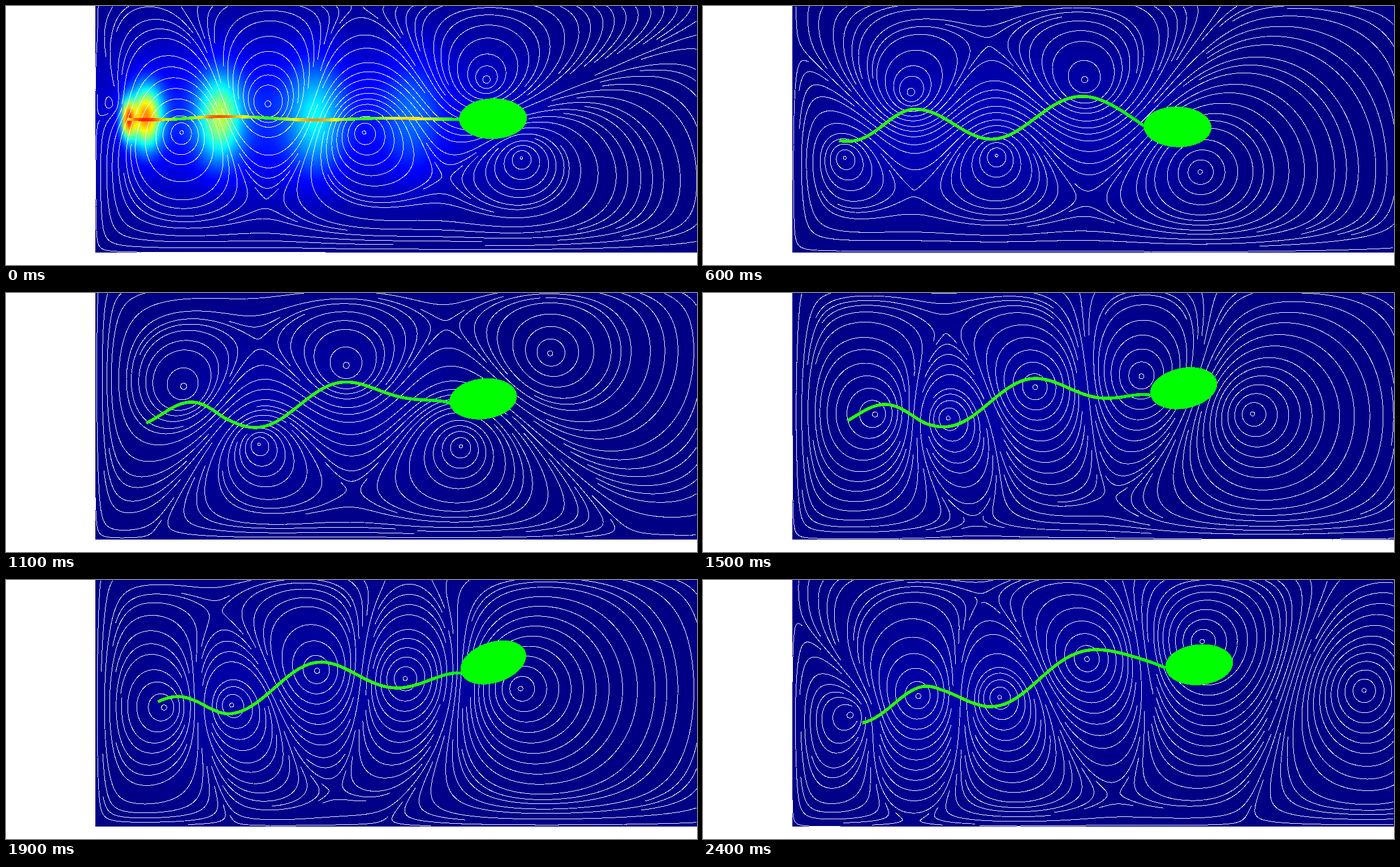
Animation of 1222x458 px, one loop 2.5 s. Source, as an HTML page with a canvas:

```html
<!DOCTYPE html>
<html lang="en">
<head>
<meta charset="utf-8">
<title>Swimmer in a viscous channel</title>
<style>
  html, body { margin: 0; width: 100%; height: 100%; overflow: hidden; background: #fff; }
  #heat { position: absolute; left: 158px; top: 0; width: 1064px; height: 440px; }
  svg { position: absolute; left: 0; top: 0; width: 1222px; height: 458px; }
</style>
</head>
<body>
<canvas id="heat" width="133" height="55"></canvas>
<svg viewBox="0 0 1222 458" shape-rendering="crispEdges">
  <defs><linearGradient id="shade" gradientUnits="userSpaceOnUse" y1="0" y2="0"></linearGradient></defs>
  <rect x="158" y="436" width="1064" height="22" fill="#fff"/>
  <path id="flow" fill="none" stroke="#fff" stroke-width="1"/>
  <path id="tail" fill="none" stroke="url(#shade)" stroke-width="5.5" stroke-linejoin="round"/>
  <ellipse id="head" rx="60" ry="36" fill="#0f0"/>
</svg>
<script>
const STEP_MS = 100, STEPS = 25;
const X0 = 158, X1 = 1222, Y1 = 436;
const WAVE = 310, HALF = WAVE / 2, LENGTH = 536, CREST = 187;
const REACH = 130, SEP = 17, GAP = 7, STRIDE = 2;
const TAU = 2 * Math.PI;
const $ = id => document.getElementById(id);
const lerp = (a, b, w) => a + (b - a) * w;
const clamp = v => Math.max(0, Math.min(1, v));

// the wave shortens towards the tip
const unfold = s => s > 400 ? 400 + (s - 400) / .75 : s;
const fold = s => s > 400 ? 400 + (s - 400) * .75 : s;

// everything about the swimmer that follows from the time step
function swimmer(n) {
  const m = n - 3, grow = Math.min(1, .1 + .3 * n), start = 1 - grow;
  const beat = .243 * m + 8e-5 * m ** 3;
  const sway = grow * Math.sin(TAU * beat);
  const x = 842 + .0041 * m ** 3 + 3 * sway + 19 * Math.exp(-n);
  const y = 209 - 2.6 * m - .035 * m * m - 13 * sway - 16 * Math.exp(-n);
  const tilt = grow * (-5 - .33 * m) - 8 * sway;
  const a = tilt * Math.PI / 180;
  const len = LENGTH + 50 * Math.exp(-n / 2);
  return {
    n, grow, beat, sway, x, y, tilt, len, stretch: len / LENGTH,
    jx: x - 60 * Math.cos(a), jy: y - 60 * Math.sin(a),
    shape: beat + .4 * start, swirl: beat + .14 * start
  };
}

// height of the tail at distance u behind the head
function tailY(p, u) {
  const s = u / p.stretch, b = s / 80;
  const drift = (.06 + .0075 * (p.n - 3)) * s - 32 * (1 - Math.exp(-s / 60));
  const bend = 18 * p.sway * b * Math.exp((1 - b * b) / 2);
  const swing = 35 * Math.sin(Math.PI * s / 620) * Math.cos(TAU * ((unfold(s) - CREST) / WAVE - p.shape));
  return p.jy + p.grow * (drift - swing) + bend;
}

// one eddy rides on every crest and trough; those at the head are pushed forward and aside
function eddiesOf(p) {
  const list = [], front = CREST + WAVE * p.swirl;
  const late = clamp((p.n - 11) / 4);
  const aside = lerp(80 - 125 * Math.max(0, p.sway), -45, late);
  for (let k = Math.ceil((front - 650) / HALF); front - HALF * k > -200; k++) {
    const s = front - HALF * k, u = fold(s) * p.stretch, sign = k % 2 ? -1 : 1;
    const power = clamp((650 - s) / 100) * clamp((200 + s) / 50);
    if (power < .05) continue;
    const near = clamp((90 - s) / 60), ahead = clamp((-70 - s) / 60);
    list.push({
      x: p.jx - u + 48 * near + (10 * p.n - 108) * ahead,
      y: lerp(tailY(p, Math.max(0, Math.min(u, p.len))), p.y, clamp(-s / 60)) - sign * aside * lerp(.35, 1, near),
      s: sign * power
    });
  }
  return list.sort((a, b) => a.x - b.x);
}

const wall = d => d * d / (d * d + 1200);

function stream(x, y, eddies) {
  let sum = 0;
  for (const e of eddies)
    sum += e.s * Math.exp(-Math.sqrt((x - e.x) ** 2 + (y - e.y) ** 2 + 30) / REACH);
  return sum * wall(x - X0 + 2) * wall(1290 - x) * wall(438 - y) * wall(y + 45);
}

function direction(x, y, eddies) {
  const u = stream(x, y + 1, eddies) - stream(x, y - 1, eddies);
  const v = stream(x - 1, y, eddies) - stream(x + 1, y, eddies);
  const r = Math.hypot(u, v) || 1;
  return [u / r, v / r];
}

const inside = (x, y) => x >= X0 && x <= X1 && y >= 0 && y <= Y1;

// evenly spaced streamlines: a line starts in free space and ends where it meets another
function streamlines(eddies) {
  const cols = Math.ceil((X1 - X0) / SEP) + 1, buckets = new Map(), out = [];
  const cell = (x, y) => [Math.floor((x - X0) / SEP), Math.floor(y / SEP)];

  function crowded(x, y, d) {
    const [i, j] = cell(x, y);
    for (let b = j - 1; b <= j + 1; b++) for (let a = i - 1; a <= i + 1; a++)
      for (const [px, py] of buckets.get(b * cols + a) || [])
        if ((px - x) ** 2 + (py - y) ** 2 < d * d) return true;
    return false;
  }

  function follow(x, y, h) {
    const pts = [], sx = x, sy = y;
    for (let i = 0; i < 1000; i++) {
      const [u, v] = direction(x, y, eddies);
      const [mu, mv] = direction(x + u * h / 2, y + v * h / 2, eddies);
      x += mu * h;
      y += mv * h;
      if (!inside(x, y) || crowded(x, y, GAP)) break;
      pts.push([x, y]);
      if (i > 6 && Math.hypot(x - sx, y - sy) < STRIDE) return { pts, closed: true };
    }
    return { pts, closed: false };
  }

  function plant(x, y) {
    if (!inside(x, y) || crowded(x, y, SEP)) return;
    const { pts, closed } = follow(x, y, STRIDE);
    const back = closed ? [] : follow(x, y, -STRIDE).pts.reverse();
    const line = [...back, [x, y], ...pts];
    if (!closed && line.length < 16) return;
    for (const q of line) {
      const [i, j] = cell(q[0], q[1]), key = j * cols + i;
      buckets.has(key) ? buckets.get(key).push(q) : buckets.set(key, [q]);
    }
    out.push('M' + line.map(q => q[0].toFixed(1) + ' ' + q[1].toFixed(1)).join('L') + (closed ? 'Z' : ''));
  }

  for (let r = 4; r < 240; r += SEP + 1)
    for (const e of eddies) {
      plant(e.x, e.y + r);
      plant(e.x, e.y - r);
    }
  for (let y = 4; y < Y1; y += 8)
    for (let x = X0 + 5; x < X1; x += 8) plant(x, y);
  return out.join('');
}

const ctx = $('heat').getContext('2d');

// fast flow crosses the tail between the eddies, hottest at the tip during the first beat
function paintHeat(p, eddies) {
  const blobs = [], fade = Math.pow(clamp(1 - p.n / 3), 3);
  const glow = .025 + .035 * Math.exp(-Math.abs(p.n - 3) / 4);
  eddies.slice(1).forEach((e, i) => {
    const o = eddies[i];
    if (e.x < 960) blobs.push([(e.x + o.x) / 2, (e.y + o.y) / 2, 75, 105, glow]);
  });
  if (fade > 0) {
    blobs.push([450, 195, 230, 105, .1 * fade]);
    const first = CREST + WAVE * p.swirl + HALF / 2;
    for (let s = first; s < 640; s += HALF) {
      const u = Math.min(p.len, fold(s) * p.stretch);
      if (u < 0) continue;
      const w = 10 + 32 * Math.sqrt(1 - u / 610);
      blobs.push([p.jx - u, p.jy - 4, w, 1.9 * w, .1 * Math.exp(u / 300) * fade]);
    }
    blobs.push([p.jx - p.len, p.jy, 8, 24, .6 * fade]);
  }
  const img = ctx.createImageData(133, 55);
  for (let j = 0, k = 0; j < 55; j++) for (let i = 0; i < 133; i++, k += 4) {
    const x = X0 + 8 * i + 4, y = 8 * j + 4;
    let v = .005;
    for (const [bx, by, w, h, s] of blobs)
      v += s * Math.exp(-(((x - bx) / w) ** 2 + ((y - by) / h) ** 2) / 2);
    v = Math.min(v, .87);
    for (let c = 0; c < 3; c++) img.data[k + c] = 255 * clamp(1.5 - Math.abs(4 * v - 3 + c));
    img.data[k + 3] = 255;
  }
  ctx.putImageData(img, 0, 0);
}

function paintTail(p) {
  let d = '', stops = '';
  for (let k = 0; k <= 70; k++) {
    const u = k / 70 * p.len;
    d += (k ? 'L' : 'M') + (p.jx - u).toFixed(1) + ' ' + tailY(p, u).toFixed(1);
  }
  const fade = Math.pow(clamp(1 - p.n / 3), 3);
  for (let k = 0; k <= 40; k++) {
    const w = k / 40, s = unfold(w * LENGTH);
    const strain = Math.sin(TAU * ((s - CREST) / WAVE - p.swirl)) ** 2;
    const warm = .08 * clamp(5 * w) + fade * (.45 + .45 * w) * strain;
    stops += `<stop offset="${w}" stop-color="hsl(${120 * (1 - clamp(warm))},100%,50%)"/>`;
  }
  $('tail').setAttribute('d', d);
  $('shade').setAttribute('x1', p.jx);
  $('shade').setAttribute('x2', p.jx - p.len);
  $('shade').innerHTML = stops;
}

function draw(step) {
  const p = swimmer(step), eddies = eddiesOf(p);
  paintHeat(p, eddies);
  paintTail(p);
  $('flow').setAttribute('d', streamlines(eddies));
  $('head').setAttribute('transform', `translate(${p.x} ${p.y}) rotate(${p.tilt})`);
}

let shown = -1;
const start = performance.now();
function tick() {
  const step = Math.floor((performance.now() - start) / STEP_MS) % STEPS;
  if (step !== shown) draw(shown = step);
  requestAnimationFrame(tick);
}
tick();
</script>
</body>
</html>
```
